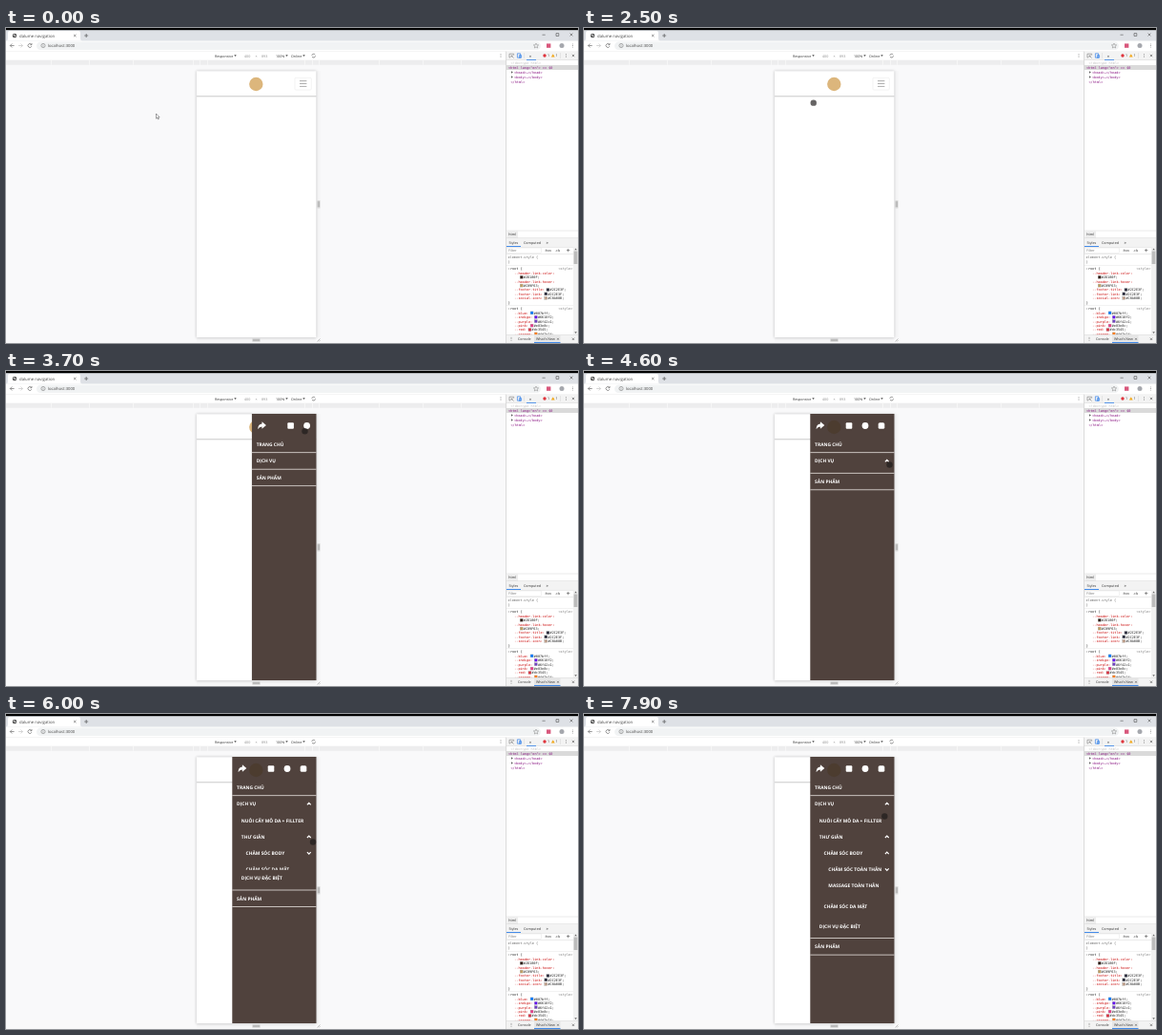
An HTML page that plays this animation: 600 px wide and 331 px high, repeating every 8 s.

```html
<!DOCTYPE html>
<html lang="en">
<head>
<meta charset="utf-8">
<title>Navigation demo</title>
<style>
  html, body { margin: 0; width: 100%; height: 100%; overflow: hidden; background: #fff; }
  svg text { font-family: "Open Sans", "Noto Sans", sans-serif; text-rendering: geometricPrecision; white-space: pre; }
  svg text.mono { font-family: "DejaVu Sans Mono", monospace; }
  #stage { display: block; width: 100%; height: 100%; }
</style>
</head>
<body>
<svg id="stage" viewBox="0 0 600 331">
  <defs>
    <clipPath id="screen"><rect x="200" y="45" width="125.5" height="280"/></clipPath>
    <filter id="blur" x="-10%" y="-10%" width="120%" height="120%"><feGaussianBlur stdDeviation="1.6"/></filter>
    <linearGradient id="fall" x2="0" y2="1"><stop stop-color="#000" stop-opacity=".2"/><stop offset="1" stop-color="#000" stop-opacity="0"/></linearGradient>
  </defs>
  <g id="browser"></g>
  <g id="page"></g>
  <g id="tools"></g>
  <g clip-path="url(#screen)"><g id="panel"></g></g>
  <circle id="touch" r="3.2" fill="#1d1a1a" opacity=".68"/>
  <path id="arrow" d="M0 0V5.2L1.2 4.1L2 6L2.8 5.6L2 3.8H3.6Z" fill="#fff" stroke="#333" stroke-width=".45"/>
</svg>
<script>
const LOOP = 8000;
const $ = id => document.getElementById(id);
const browser = $('browser'), page = $('page'), tools = $('tools'), panel = $('panel');

function add(parent, tag, attrs, content) {
  const el = document.createElementNS('http://www.w3.org/2000/svg', tag);
  for (const k in attrs) el.setAttribute(k, attrs[k]);
  if (content) el.textContent = content;
  parent.appendChild(el);
  return el;
}
const rect = (p, x, y, width, height, fill, more) => add(p, 'rect', { x, y, width, height, fill, ...more });
const dot = (p, cx, cy, r, fill, more) => add(p, 'circle', { cx, cy, r, fill, ...more });
const line = (p, d, stroke = '#555', w = .6) => add(p, 'path', { d, stroke, fill: 'none', 'stroke-width': w });
const shape = (p, d, fill) => add(p, 'path', { d, fill });
const text = (p, x, y, s, size = 3.65, fill = '#333', more) => add(p, 'text', { x, y, 'font-size': size, fill, ...more }, s);
const cross = (p, x, y, r = 1.4) => line(p, `M${x - r} ${y - r}l${2 * r} ${2 * r}m0 ${-2 * r}l${-2 * r} ${2 * r}`);
const dots = (p, x, y) => [-1.6, 0, 1.6].forEach(d => dot(p, x, y + d, .45, '#555'));
const caret = (p, x, y) => shape(p, `M${x - 1.2} ${y - .8}h2.4l-1.2 1.8z`, '#444');

function drawBrowser(p) {
  rect(p, 0, 0, 600, 331, '#f9f9fa');
  rect(p, 0, 0, 600, 14, '#dee1e6');
  rect(p, 0, 0, 600, 2.2, '#000');
  shape(p, 'M0 13.5Q2 13.5 2 11V5Q2 3 4 3H76Q78 3 78 5V11Q78 13.5 80 13.5Z', '#fff');
  dot(p, 9, 8, 2.3, '#555');
  line(p, 'M7.4 7.2h1.6v1.2h1.4', '#fff', .7);
  text(p, 14, 9.5, 'dalume navigation', 4.3, '#444');
  cross(p, 72.3, 8, 1.2);
  line(p, 'M82.2 8h4M84.2 6v4', '#444');
  line(p, 'M562.5 7.2h3.2M577 5.6h2.8v2.8h-2.8z', '#333', .5);
  cross(p, 593, 7, 1.4);

  rect(p, 0, 13.5, 600, 11, '#fff');
  rect(p, 32, 14.4, 529, 8.6, '#f1f3f4', { rx: 4.3 });
  line(p, 'M8.6 18.5H4.4M6.3 16.5L4.3 18.5L6.3 20.5');
  line(p, 'M13 18.5h4.4M15.4 16.5l2 2l-2 2', '#bbb');
  line(p, 'M26.7 17.3A2 2 0 1 0 26.9 19.2M27 16v1.7h-1.7');
  line(p, 'M39 18.2v1.5M39 16.8v.6M41.1 18.5a2.1 2.1 0 1 1-4.2 0a2.1 2.1 0 1 1 4.2 0', '#666', .5);
  text(p, 44, 20, 'localhost:3000', 4.2, '#444');
  line(p, 'M556 16l.8 1.8l1.9.1l-1.5 1.2l.5 1.9l-1.7-1l-1.7 1l.5-1.9l-1.5-1.2l1.9-.1z', '#777', .45);
  rect(p, 567, 16.4, 4.4, 4.4, '#d8577c');
  dot(p, 583, 18.5, 2.5, '#a5a7ad');
  dots(p, 594.5, 18.5);
  rect(p, 0, 24.2, 600, .4, '#dcdcdc');

  rect(p, 0, 24.7, 524.5, 9, '#fff');
  text(p, 219, 30.5, 'Responsive');
  caret(p, 240.5, 29);
  text(p, 250, 30.5, '400', 3.65, '#888');
  text(p, 261.5, 30.5, '×', 3.65, '#888');
  text(p, 268, 30.5, '893', 3.65, '#888');
  text(p, 283, 30.5, '100%');
  caret(p, 294.5, 29);
  text(p, 299, 30.5, 'Online');
  caret(p, 312.5, 29);
  line(p, 'M324.3 28A2 2 0 0 0 320.8 28.8M321 30.2A2 2 0 0 0 324.6 29.4', '#666', .7);
  dots(p, 519, 29);
  rect(p, 0, 33.7, 524.5, 5, '#ededee');
  for (const d of [51, 59, 66, 129, 175, 215])
    for (const x of [262 - d, 262 + d]) rect(p, x, 33.7, .7, 5, '#fafafa');
}

function drawPage(p) {
  rect(p, 326, 45, 4, 280, '#f6f6f7');
  rect(p, 200, 326, 125, 4, '#f6f6f7');
  rect(p, 199.7, 45, 125.8, 280.6, '#000', { opacity: .2, filter: 'url(#blur)' });
  rect(p, 200, 45.3, 125.3, 279.7, '#fff');
  rect(p, 200, 71, 125.3, 2.2, 'url(#fall)');
  rect(p, 326.3, 181, 3.2, 8.5, '#dcdcdc');
  line(p, 'M327.2 182.2v6M328.6 182.2v6', '#888', .5);
  rect(p, 258, 326.2, 9, 3.4, '#dcdcdc');
  line(p, 'M259 327.3h7M259 328.7h7', '#888', .5);
  line(p, 'M326.5 329.5l3-3M328.2 329.5l1.3-1.3', '#888', .5);
  dot(p, 262.3, 59, 7.2, '#dcb67c');
  line(p, 'M308 55.6h7.4M308 58.5h7.4M308 61.4h7.4', '#8c8c8c', .7);
}

function drawTools(p) {
  const mono = (x, y, s, fill = '#222') => text(p, x, y + 1.3, s, 3.5, fill, { class: 'mono' });
  const tag = '#881280', prop = '#c80000';
  rect(p, 524.5, 24.7, 75.5, 306.3, '#fff');
  rect(p, 524.3, 24.7, .6, 306.3, '#c4c4c4');
  rect(p, 525, 24.7, 75, 9, '#f3f3f3');
  rect(p, 525, 33.5, 75, .4, '#ccc');
  line(p, 'M529 31h-1v-3.8h4.6v1.4M530 29l2.6 2.6M530 29v1.8M530 29h1.8', '#666', .5);
  line(p, 'M536.4 26.8h3.2v4.4h-3.2zM538.4 28.6h2.2v2.6h-2.2z', '#1a73e8', .6);
  rect(p, 543.2, 26, .4, 6, '#ccc');
  rect(p, 546, 33, 10, .7, '#1a73e8');
  text(p, 548.8, 30.5, '»', 4.6);
  dot(p, 565, 29, 1.7, '#e0343c');
  text(p, 568, 30.3, '1');
  shape(p, 'M573.8 27.3l1.9 3.3h-3.8z', '#f2a91d');
  text(p, 576.4, 30.3, '1');
  rect(p, 581.3, 26, .4, 6, '#ccc');
  dots(p, 587.5, 29);
  cross(p, 595, 29, 1.2);

  mono(529.5, 36.5, '<!doctype html>', '#c0c0c0');
  rect(p, 525, 39, 75, 5, '#dadada');
  mono(527, 41.6, '<html lang="en"> == $0', tag);
  [['head', 46.5], ['body', 51.5]].forEach(([n, y]) => {
    shape(p, `M530 ${y - 1.2}l1.8 1.2l-1.8 1.2z`, '#555');
    mono(533, y, `<${n}>…</${n}>`, tag);
  });
  mono(529.5, 56.5, '</html>', tag);

  rect(p, 525, 212.8, 75, .4, '#ccc');
  rect(p, 525.5, 213.2, 11.5, 7.6, '#ededed');
  text(p, 527.3, 218.3, 'html');
  rect(p, 525, 220.8, 75, 9.2, '#f3f3f3');
  rect(p, 525, 220.6, 75, .4, '#ccc');
  text(p, 527.5, 226.6, 'Styles');
  rect(p, 525, 229.2, 15, .8, '#1a73e8');
  text(p, 543, 226.6, 'Computed');
  text(p, 566.5, 226.8, '»', 4.6);
  rect(p, 525, 230, 75, .4, '#ccc');
  text(p, 527, 235, 'Filter', 3.65, '#777');
  rect(p, 525.5, 231, 36, 5.6, 'none', { stroke: '#ddd', 'stroke-width': .4 });
  text(p, 565, 235, ':hov');
  text(p, 576, 235, '.cls');
  line(p, 'M588 233.6h3.4M589.7 231.9v3.4', '#555');
  rect(p, 525, 237, 75, .4, '#ccc');

  mono(526.5, 241, 'element.style {', '#666');
  mono(526.5, 246, '}', '#666');
  const swatch = (x, y, c) => {
    rect(p, x, y - 1.5, 3, 3, c, { stroke: '#999', 'stroke-width': .3 });
    mono(x + 3.6, y, c + ';');
  };
  const rule = (y, props) => {
    rect(p, 525, y - 4, 70, .4, '#ddd');
    mono(526.8, y, ':root {');
    mono(579.5, y, '<style>', '#777');
    for (const [name, color, wrap] of props) {
      y += 4.4;
      mono(533.2, y, `--${name}:`, prop);
      if (wrap) swatch(539.2, y += 4.4, color);
      else swatch(533.2 + 2.11 * (name.length + 4), y, color);
    }
    return y + 4.4;
  };
  const end = rule(253, [
    ['header-link-color', '#2D180F', 1], ['header-link-hover', '#C09F63', 1],
    ['footer-title', '#2C2E3F'], ['footer-link', '#2C2E3F'], ['social-icon', '#C0A08B']
  ]);
  mono(526.8, end, '}');
  rule(295, [
    ['blue', '#007bff'], ['indigo', '#6610f2'], ['purple', '#6f42c1'],
    ['pink', '#e83e8c'], ['red', '#dc3545'], ['orange', '#fd7e14']
  ]);
  rect(p, 595, 230.3, 5, 92, '#f1f1f1');
  rect(p, 595.6, 234.5, 3.8, 13.5, '#bcbcbc');
  shape(p, 'M596.3 233.2h2.6l-1.3-1.6z', '#666');
  shape(p, 'M596.3 319.3h2.6l-1.3 1.6z', '#666');

  rect(p, 525, 322.3, 75, 8.7, '#f3f3f3');
  rect(p, 525, 322.1, 75, .4, '#ccc');
  dots(p, 530, 326.8);
  text(p, 537, 328.1, 'Console');
  rect(p, 554, 322.5, 27.5, 8.5, '#e6e6e6');
  rect(p, 554, 330.2, 27.5, .8, '#1a73e8');
  text(p, 556, 328.1, "What's New");
  cross(p, 579, 326.8, .9);
  cross(p, 595, 326.8, 1.2);
}

// Menu: each node may hold sub items and the time at which it opens.
const ROW = 17.2, TOP_ROW = 17.5, PAD = 4, OPEN = 350, PANEL_X = 237.3;
const menu = [
  { label: 'TRANG CHỦ' },
  { label: 'DỊCH VỤ', at: 4570, sub: [
    { label: 'NUÔI CẤY MÔ DA + FILLTER' },
    { label: 'THƯ GIÃN', at: 5860, sub: [
      { label: 'CHĂM SÓC BODY', at: 6760, sub: [
        { label: 'CHĂM SÓC TOÀN THÂN', at: Infinity, sub: [] },
        { label: 'MASSAGE TOÀN THÂN' }
      ] },
      { label: 'CHĂM SÓC DA MẶT' }
    ] },
    { label: 'DỊCH VỤ ĐẶC BIỆT' }
  ] },
  { label: 'SẢN PHẨM' }
];

function build(parent, node, depth) {
  node.row = depth ? ROW : TOP_ROW;
  node.g = add(parent, 'g', {});
  text(node.g, 4.8 + depth * 4.75, node.row / 2 + 1.8, node.label, 4.88, '#fff', { 'font-weight': 700 });
  if (node.sub) {
    node.mark = add(node.g, 'path', { fill: 'none', stroke: '#fff', 'stroke-width': 1.2 });
    node.box = add(node.g, 'svg', { x: 0, y: node.row, width: 90, height: 0, overflow: 'hidden' });
    node.sub.forEach(n => build(node.box, n, depth + 1));
  }
  if (!depth) node.rule = rect(node.g, 0, 0, 90, .8, '#e6e0dd');
}

function stack(nodes, y, t) {
  for (const n of nodes) {
    n.g.setAttribute('transform', `translate(0 ${y})`);
    y += layout(n, t);
  }
  return y;
}

function layout(n, t) {
  let h = n.row;
  if (n.sub) {
    const open = t >= n.at, d = open ? -1 : 1, mid = n.row / 2;
    n.mark.setAttribute('d', `M78.6 ${mid - d}l1.9 ${2 * d}l1.9 ${-2 * d}`);
    const full = stack(n.sub, 0, t) + PAD;
    const size = open ? Math.max(PAD, full * ease((t - n.at) / OPEN)) : 0;
    n.box.setAttribute('height', size);
    h += size;
  }
  if (n.rule) n.rule.setAttribute('y', h - .4);
  return h;
}

// CSS "ease" curve
function ease(p) {
  if (p <= 0) return 0;
  if (p >= 1) return 1;
  let lo = 0, hi = 1, u;
  for (let i = 0; i < 24; i++) {
    u = (lo + hi) / 2;
    const x = .75 * u * (1 - u) + u ** 3;
    if (x < p) lo = u; else hi = u;
  }
  return .3 * u * (1 - u) ** 2 + 3 * u * u * (1 - u) + u ** 3;
}

// time, x, y of the pointer
const track = [
  [0, 157.5, 90], [400, 157.5, 90], [1400, 168, 94], [1900, 168, 94], [3100, 313.5, 63.3],
  [3800, 313.5, 63.3], [4400, 320.5, 98.5], [5000, 320.5, 98.5], [5600, 322, 134.5],
  [6200, 322, 134.5], [6600, 318.5, 148], [7100, 318.5, 148], [7800, 315.3, 107.5], [8000, 315.3, 107.5]
];

function pointer(t) {
  const i = track.findIndex(k => k[0] > t);
  const [t0, x0, y0] = track[i - 1], [t1, x1, y1] = track[i];
  const p = (t - t0) / (t1 - t0), s = p * p * (3 - 2 * p);
  return [x0 + (x1 - x0) * s, y0 + (y1 - y0) * s];
}

drawBrowser(browser);
drawPage(page);
const button = rect(page, 303, 52.3, 17.3, 12.8, 'none', { rx: 1 });
drawTools(tools);
rect(panel, 0, 45, 90, 281, '#50423d');
const ghost = dot(panel, 25, 59, 7.2, '#483622', { opacity: .5 });
shape(panel, 'M15 57L10.6 53.2V55.5Q6.4 55.9 6.3 61.2Q7.6 58.7 10.6 58.6V60.8Z', '#fff');
rect(panel, 37.4, 54.2, 6.6, 6.6, '#fff', { rx: 1 });
dot(panel, 57.7, 57.5, 3.4, '#fff');
rect(panel, 71.4, 54.2, 6.6, 6.6, '#fff', { rx: 1.6 });
menu.forEach(n => build(panel, n, 0));

function render(time) {
  let t = Math.floor(time / 100) * 100;
  if (t === 100) t = 0;
  const slide = ease((t - 3560) / 300);
  panel.setAttribute('transform', `translate(${PANEL_X + 88.5 * (1 - slide)} 0)`);
  ghost.setAttribute('visibility', slide === 1 ? 'visible' : 'hidden');
  stack(menu, 68.2, t);

  const focus = t >= 3500;
  button.setAttribute('stroke', focus ? '#f2b584' : '#ebebeb');
  button.setAttribute('stroke-width', focus ? 1 : .6);

  const [x, y] = pointer(t), inside = x > 200;
  $('touch').setAttribute('visibility', inside ? 'visible' : 'hidden');
  $('arrow').setAttribute('visibility', inside ? 'hidden' : 'visible');
  $('touch').setAttribute('cx', x);
  $('touch').setAttribute('cy', y);
  $('arrow').setAttribute('transform', `translate(${x} ${y})`);
}

const start = performance.now();
function tick() {
  render((performance.now() - start) % LOOP);
  requestAnimationFrame(tick);
}
tick();
</script>
</body>
</html>
```
